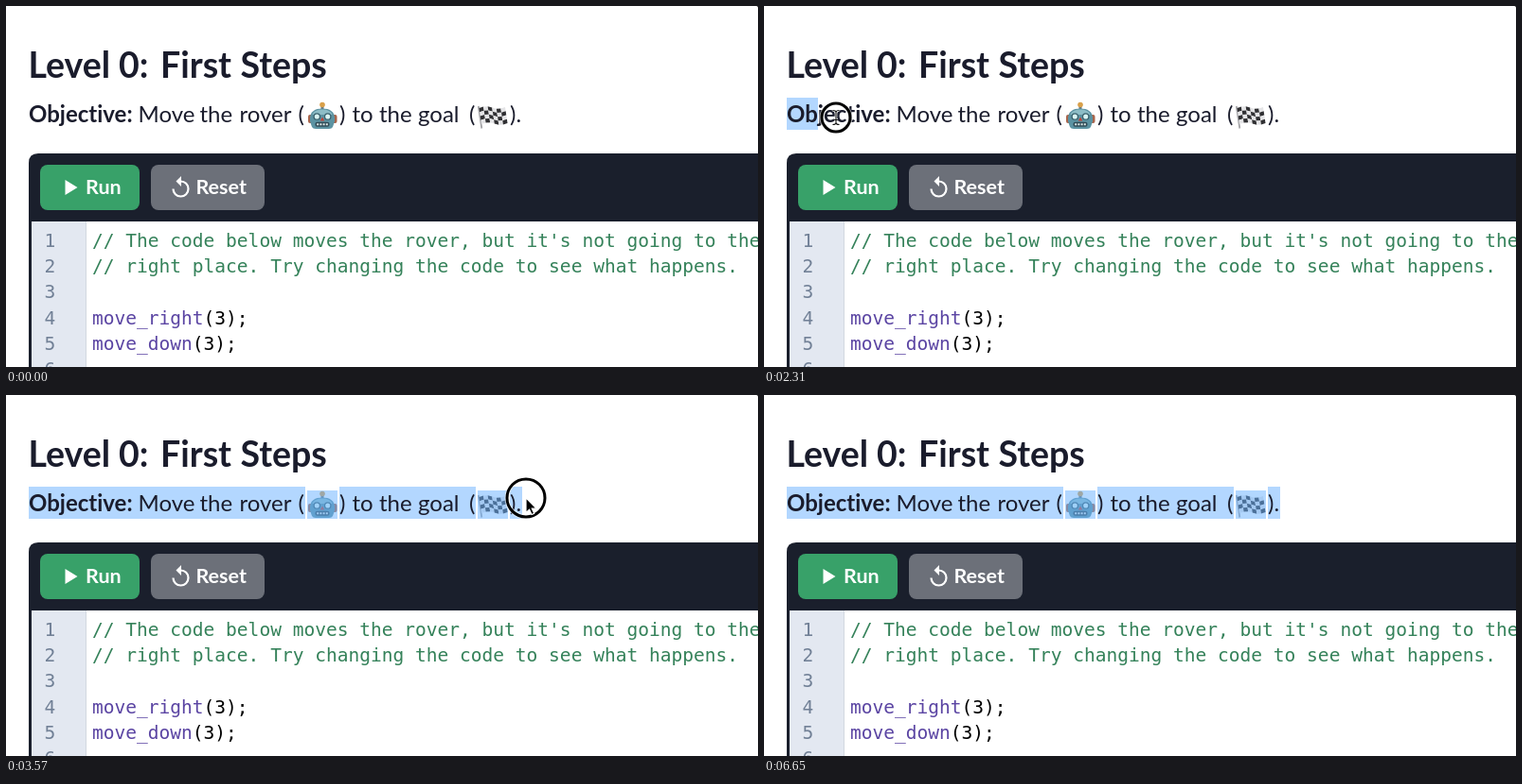
Recreate the animation shown at these times as an HTML page. Size 794 by 382 pixels, loop 7000 ms.

```html
<!DOCTYPE html>
<html lang="en">
<head>
<meta charset="utf-8">
<title>Level 0</title>
<style>
  html, body { margin: 0; width: 100%; height: 100%; overflow: hidden; background: #fff; }
  svg { display: block; }
  text { font-family: Lato, sans-serif; font-variant-ligatures: none; fill: #1a1c2c; white-space: pre; }
  .title { font-size: 37.5px; font-weight: 700; }
  .body { font-size: 24px; }
  .strong { font-weight: 700; }
  .button { font-size: 21.5px; font-weight: 700; fill: #fff; }
  .code { font: 19.55px "DejaVu Sans Mono", monospace; fill: #000; }
  .code .number { fill: #718096; }
  .code .comment { fill: #35825a; }
  .code .call { fill: #5b45a3; }
</style>
</head>
<body>
<svg width="794" height="382" viewBox="0 0 794 382">
  <path d="M792.500 0h1.500v1.500zM794 382h-1.500l1.500-1.500z" fill="#555"/>
  <g id="textSelection" fill="#b3d7ff"></g>

  <text class="title" y="76"><tspan x="23.500">Level</tspan><tspan x="119">0:</tspan><tspan x="163">First</tspan><tspan x="247.500">Steps</tspan></text>
  <text class="body" y="123"><tspan class="strong" x="24">Objective:</tspan><tspan x="139.500">Move</tspan><tspan x="204.500">the</tspan><tspan x="246.500">rover</tspan><tspan x="308.500">(</tspan><tspan x="352">)</tspan><tspan x="365.500">to</tspan><tspan x="394">the</tspan><tspan x="435">goal</tspan><tspan x="489">(</tspan><tspan x="532">).</tspan></text>

  <g id="robot">
    <path d="M334 106v5" stroke="#68777d" stroke-width="3"/>
    <circle cx="334" cy="104.500" r="2.800" fill="#d9a04a"/>
    <rect x="319" y="115" width="30.500" height="9" rx="2" fill="#a8644a"/>
    <path d="M321 122v-4q1-9.500 13-9.500t13 9.500v4l-2 6q-1 2-4 2H327q-3 0-4-2z" fill="#5c93a2"/>
    <path d="M323.500 115q2-5.500 10.500-5.500t10.500 5.500z" fill="#8dbdc6"/>
    <g fill="#d9f4f2" stroke="#39606c" stroke-width="1.300">
      <circle cx="328.300" cy="117" r="3.200"/><circle cx="339.700" cy="117" r="3.200"/>
    </g>
    <path d="M334 117.500l2.300 4h-4.600z" fill="#c24438"/>
    <rect x="326.500" y="122.800" width="15" height="5" rx="2" fill="#314c57"/>
    <path d="M328.200 125.300h12" stroke="#dce9e8" stroke-width="2" stroke-dasharray="2 1.200"/>
  </g>
  <g id="flag"><path d="M498.800 106l3.500 23.500" stroke="#a5a5a8" stroke-width="1.800"/></g>
  <g id="emojiSelection" fill="#66afff" fill-opacity=".5"></g>

  <path d="M24 382V166q0-10 10-10H794V382z" fill="#1a1f2c"/>
  <path d="M27 228H794V382H27z" fill="#fff"/>
  <path d="M27 228H84V382H27z" fill="#e3e8f1"/>
  <path d="M84.500 228V382" stroke="#d3d8e0"/>
  <rect x="36" y="168" width="105" height="48" rx="8" fill="#38a169"/>
  <rect x="153" y="168" width="120" height="48" rx="8" fill="#6c7079"/>
  <path d="M62.500 184v16l13-8z" fill="#fff"/>
  <path d="M176.500 193.500a8 8 0 1 0 8-8" fill="none" stroke="#fff" stroke-width="2.200"/>
  <path d="M185 180v11l-5.500-5.500z" fill="#fff"/>
  <text class="button" x="84" y="199">Run</text>
  <text class="button" x="200.500" y="199">Reset</text>
  <g id="editor"></g>
  <path id="caret" d="M90.500 371V382" stroke="#111"/>

  <g id="pointer">
    <g id="ring" fill="none">
      <circle stroke="#fff" stroke-width="5" stroke-opacity=".6"/>
      <circle stroke="#000" stroke-width="3"/>
    </g>
    <path id="arrow" d="M0 0V15.500L3.600 12.200 6 17.600 8.700 16.400 6.300 11.200H11z" fill="#000" stroke="#fff" stroke-width="1.200"/>
    <g id="hand">
      <path d="M-1.500 9V1.500a1.700 1.700 0 0 1 3.400 0V6q2.500-1.200 3.200.6 2.300-.8 3 .8 2.300-.3 2.300 1.700c0 4-1.500 4.500-1.800 7.900H.5C0 14-4 11.500-5 9q0-2.500 3.500 0z" fill="#fff" stroke="#000" stroke-width="1.200"/>
      <path d="M2.200 11v3.500M4.600 11v3.500M7 11v3.500" stroke="#000"/>
    </g>
    <g id="beam" fill="none">
      <path d="M-3.500-7.500Q0-7.500 0-5.500 0-7.500 3.500-7.500M0-5.500V5.500M-3.500 7.500Q0 7.500 0 5.500 0 7.500 3.500 7.500M-2 2.500H2" stroke="#fff" stroke-width="2.600"/>
      <path d="M-3.500-7.500Q0-7.500 0-5.500 0-7.500 3.500-7.500M0-5.500V5.500M-3.500 7.500Q0 7.500 0 5.500 0 7.500 3.500 7.500M-2 2.500H2" stroke="#111" stroke-width="1.100"/>
    </g>
  </g>
</svg>
<script>
const LOOP = 7000, STEP = 70, PRESS = 2100, RELEASE = 3500;
const $ = id => document.getElementById(id);

function add(parent, tag, attributes, text = '') {
  const node = document.createElementNS('http://www.w3.org/2000/svg', tag);
  for (const name in attributes) node.setAttribute(name, attributes[name]);
  node.textContent = text;
  return parent.appendChild(node);
}

const show = (node, visible) => node.setAttribute('visibility', visible ? 'visible' : 'hidden');

// Code lines: [call or comment, remaining text]
const lines = [
  ["// The code below moves the rover, but it's not going to the", ''],
  ['// right place. Try changing the code to see what happens.', ''],
  ['', ''], ['move_right', '(3);'], ['move_down', '(3);'], ['', '']
];
lines.forEach(([head, tail], i) => {
  const row = add($('editor'), 'text', { class: 'code', y: 255 + 27.2 * i });
  add(row, 'tspan', { class: 'number', x: 40.5 }, i + 1);
  add(row, 'tspan', { class: head.startsWith('//') ? 'comment' : 'call', x: 91 }, head);
  add(row, 'tspan', {}, tail);
});

// Waving checkered flag
const wave = (u, v) => [499.5 + 27.5 * u + 2.5 * v, 108 + 17 * v - 1.6 * Math.sin(u * 6.3) - u];
for (let col = 0; col < 6; col++) {
  for (let row = 0; row < 4; row++) {
    const corners = [[0, 0], [1, 0], [1, 1], [0, 1]].map(([x, y]) => wave((col + x) / 6, (row + y) / 4));
    add($('flag'), 'polygon', { points: corners.join(' '), fill: (col + row) % 2 ? '#e4e4e6' : '#303033' });
  }
}

const textParts = [[24, 316], [352, 496], [532, 545]].map(([from, to]) =>
  ({ from, to, node: add($('textSelection'), 'rect', { x: from, y: 97, height: 34 }) }));
const emojiParts = [318, 498].map(x =>
  ({ x, node: add($('emojiSelection'), 'rect', { x, y: 101, width: 32, height: 30 }) }));

// Pointer path: time, x, y
const path = [
  [910, 158, 376], [980, 138, 305], [1050, 114, 235], [1120, 101, 202], [1400, 98, 198],
  [1610, 60, 150], [1890, 27, 117], [2100, 27, 117], [2310, 76, 118], [2940, 360, 124],
  [3360, 525, 114], [3500, 549, 109], [4970, 549, 108], [5320, 535, 177],
  [5530, 470, 270], [5740, 403, 360], [5810, 403, 376]
];

function pointerAt(t) {
  const next = path.findIndex(point => point[0] >= t);
  if (next < 1) return path[next < 0 ? path.length - 1 : 0].slice(1);
  const a = path[next - 1], b = path[next], k = (t - a[0]) / (b[0] - a[0]);
  return [a[1] + (b[1] - a[1]) * k, a[2] + (b[2] - a[2]) * k];
}

function pointerShape(x, y) {
  if (x > 36 && x < 141 && y > 168 && y < 216) return 'hand';
  const overText = x >= 24 && x < 545 && y > 97 && y < 131;
  return overText || y > 228 ? 'beam' : 'arrow';
}

function drawSelection(t) {
  const x = t < PRESS ? 0 : pointerAt(Math.min(t, RELEASE + 40) - 40)[0];
  const end = x > 540 ? 545 : 24 + Math.floor((x - 24) / 11) * 11;
  for (const { from, to, node } of textParts)
    node.setAttribute('width', Math.max(0, Math.min(end, to) - from));
  for (const part of emojiParts) show(part.node, x > part.x + 16);
}

function drawPointer(t) {
  const [x, y] = pointerAt(t), shape = pointerShape(x, y);
  const visible = t >= 910 && t < 5880;
  $('pointer').setAttribute('transform', `translate(${x} ${y})`);
  for (const name of ['arrow', 'hand', 'beam']) show($(name), visible && name === shape);

  const grow = Math.max(0, (t - RELEASE) / STEP);
  show($('ring'), t >= PRESS && grow < 3);
  $('ring').setAttribute('opacity', grow > 1 ? 0.4 : 1);
  for (const circle of $('ring').children) circle.setAttribute('r', 15 + 5 * grow);
}

function frame(now) {
  const t = Math.floor((now % LOOP) / STEP) * STEP;
  drawSelection(t);
  drawPointer(t);
  show($('caret'), t >= 1050 && t < 1680);
  requestAnimationFrame(frame);
}
frame(0);
</script>
</body>
</html>
```
